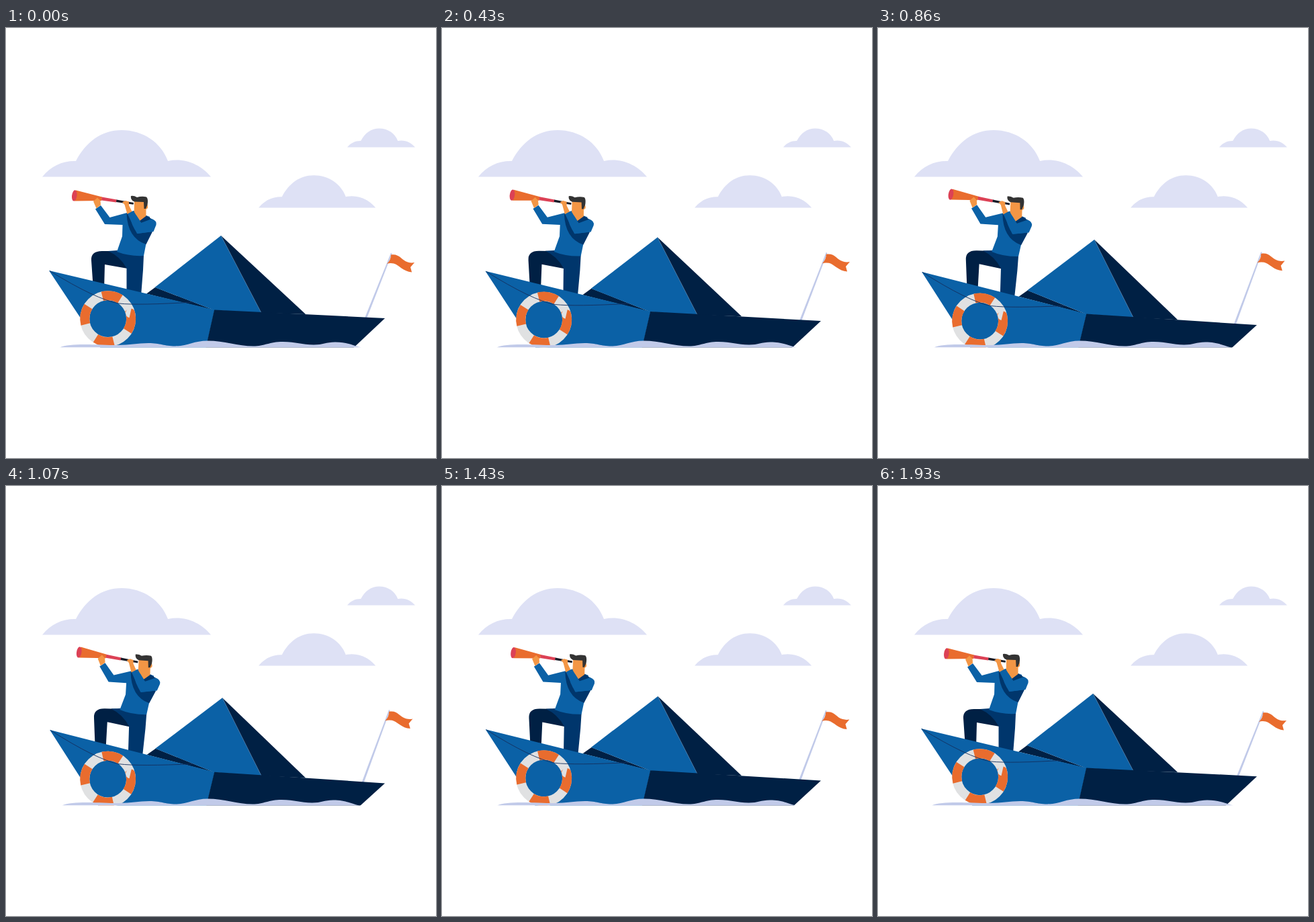
An HTML page for the animation above (2 s loop, 640 by 640 pixels).

```html
<!DOCTYPE html>
<html lang="en">
<head>
<meta charset="utf-8">
<title>Paper boat</title>
<style>
  html, body { margin: 0; height: 100%; overflow: hidden; background: #fff; }
  svg { display: block; width: 100vw; height: 100vh; }
  .blue { fill: #0b61a6; }
  .mid { fill: #00366c; }
  .navy { fill: #002044; }
  .skin { fill: #f39645; }
  .orange { fill: #e96c2e; }
  .red { fill: #dc4155; }
  .black { fill: #161a26; }
  .hair { fill: #333; }
  .cloud { fill: #dee1f5; }
  .wave { fill: #c1cae9; }
</style>
</head>
<body>
<svg viewBox="0 0 640 640">
  <defs>
    <path id="cloud" class="cloud" d="M0 0C13-16 30-24 50-23.500C65-52 88-69.500 118-69.500C150-69.500 177-51 187-23.500C212-29 236-18 251 0Z"/>
  </defs>
  <use href="#cloud" transform="translate(54 221.500)"/>
  <use href="#cloud" transform="translate(376 267.500) scale(.694)"/>
  <use href="#cloud" transform="translate(508 177.500) scale(.402)"/>

  <g id="man">
    <path class="navy" d="M127 346Q126 332 143 332L160 332Q176 342 181 358L147 352L146 390L130 390Z"/>
    <path class="mid" d="M152 332L166 331L205 338L204 360L200.500 405L179.500 405L179.500 357.500Q170 340 152 332Z"/>
    <path class="blue" d="M133 269.500L141 264L154.500 282L182 274.500L190 272L214 281L217 304L208.500 321L205 339Q183 340 165 333L173 310L173.500 293L147 292Z"/>
    <path class="mid" d="M179.500 276Q181 313 208.500 322L218 303L196 306Q186 294 184 277Z"/>
    <path class="skin" d="M191 258L206 258Q212 262 211 268L208.500 270L208.500 282L199.500 287L194 279L190.500 278Z"/>
    <path class="mid" d="M199 287L209 279.500L219 285.500L203 292Z"/>
    <path class="blue" d="M181 277L190 272.500L201 290L217 284Q225 287 223.500 293L219.500 303L195 306Z"/>
    <path class="hair" d="M186 250Q190 249 195 252Q202 250 209 251.500Q212 254 210.500 263L208 269L205.500 269L205 259L191 258.500Q185 256 186 250Z"/>
    <path class="orange" d="M104 241.500L143 251.500L142 257L102 257.500Z"/>
    <ellipse class="red" cx="101.800" cy="249.500" rx="3.700" ry="8.200" transform="rotate(7 102 249.500)"/>
    <path class="red" d="M142.500 251.500L165 255.500L164 259.500L142 256.500Z"/>
    <path class="black" d="M164.500 255.500L190 260L189.500 262.800L164 259Z"/>
    <path class="skin" d="M130 258L136 252.500L140.500 257L141 263.500L134.500 268.500Z"/>
    <path class="skin" d="M173 259L178 257L183 258.500L183 264L187.500 273L180.500 277L176.500 263Z"/>
  </g>

  <g id="flag">
    <path class="wave" d="M573 334.500L574.500 336L530 450L526.500 450Z"/>
    <path class="orange" d="M573 337.500C586 335.500 588 345.500 598 348.500Q603 350 608 349L602 356L604 363.500C591 362.500 585 352.500 577 350.500Q571 349.500 567 351Q573 345 573 337.500Z"/>
  </g>

  <g id="boat">
    <path class="navy" d="M320 309L446 426L380 424ZM222 386L310 420L209 395.500Z"/>
    <path class="blue" d="M320 309L380 424L310 420L221.500 386Z"/>
    <path d="M320 309L380 424" stroke="#55759b" stroke-width=".5"/>
    <path class="blue" d="M64 361L310.500 419.500L297 480L143 480Z"/>
    <path class="navy" d="M310 419.500L564 432L513 480L296.500 480Z"/>
    <g fill="none" stroke-width="14">
      <circle class="blue" cx="151.700" cy="432.700" r="34.400" stroke="#e0e1e2"/>
      <circle cx="151.700" cy="432.700" r="34.400" stroke="#e96c2e" pathLength="360"
        stroke-dasharray="46 44" transform="rotate(-104 151.700 432.700)"/>
    </g>
    <path d="M65 361.500Q134 404 168 410Q198 413 278 408" fill="none" stroke="#14305f" stroke-width=".9"/>
  </g>

  <path id="wave" class="wave" d="M80 475.500C95 468 140 472 165 472C185 472 195 469 212 469C230 469 235 473.500 252 473.500C270 473.500 280 465.500 300 465.500C325 465.500 345 473.500 368 473.500C385 473.500 392 467 412 467C432 467 440 471.500 458 471.500C472 471.500 476 467.500 490 467.500C508 467.500 515 472 529 475.500Z"/>
  <rect y="475.500" width="640" height="165" fill="#fff"/>
</svg>
<script>
  const LOOP = 2000, STEPS = 28;
  const start = performance.now();
  const pose = (id, value) => document.getElementById(id).setAttribute('transform', value);

  function draw(now) {
    // The rocking advances in even steps.
    const t = Math.max(0, now - start) % LOOP;
    const step = Math.floor((t + 5) / LOOP * STEPS);
    const k = (1 - Math.cos(step / STEPS * 2 * Math.PI)) / 2;

    pose('boat', `rotate(${0.98 * k} -54 432)`);
    pose('man', `rotate(${1.78 * k} 170 475)`);
    pose('flag', `translate(${-3 * k} ${-1.7 * k}) rotate(${-1.4 * k} 573 336)`);
    pose('wave', `translate(305 0) scale(${1 - 0.016 * k} 1) translate(-305 0)`);
    requestAnimationFrame(draw);
  }
  draw(start);
</script>
</body>
</html>
```
